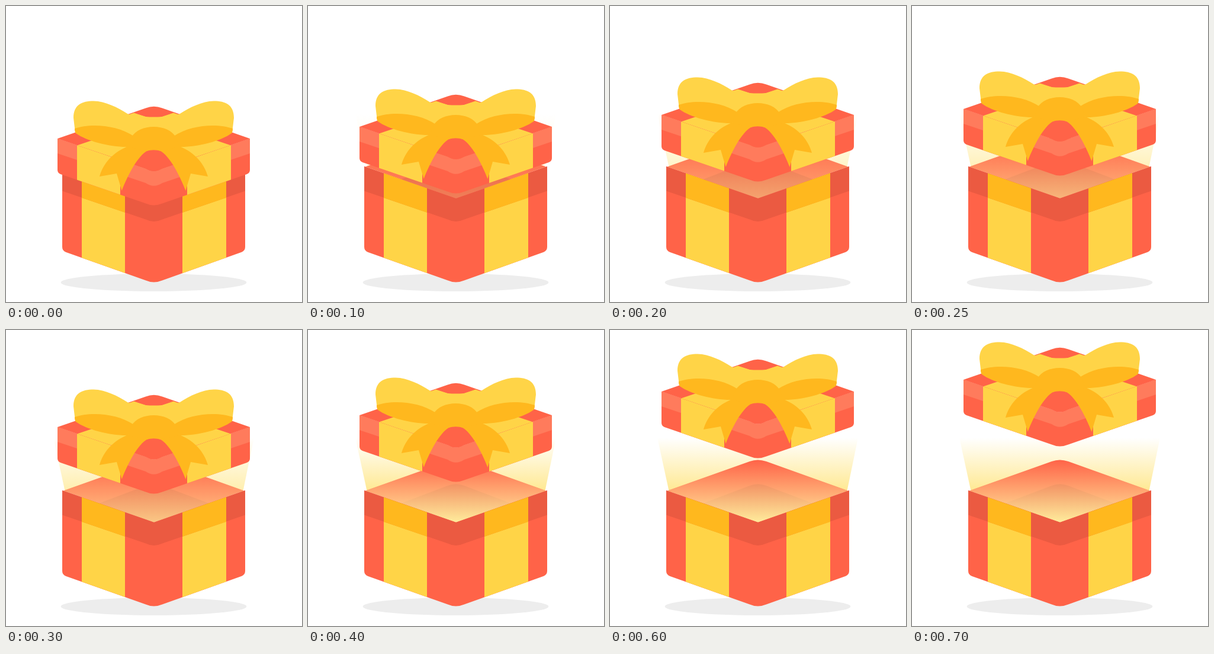
An HTML page for the animation above (0.75 s loop, 500 px wide and 500 px high).

```html
<!DOCTYPE html>
<html lang="en">
<head>
<meta charset="utf-8">
<title>Gift box</title>
<style>
  html, body { margin: 0; width: 100%; height: 100%; overflow: hidden; background: #fff; }
  svg { display: block; width: 100vw; height: 100vh; }
  .red { fill: #ff6348; }
  .rose { fill: #ff7b5c; }
  .dark { fill: #eb5a41; }
  .yellow { fill: #ffd447; }
  .orange { fill: #ffb81e; }
</style>
</head>
<body>
<svg viewBox="0 0 500 500">
  <defs>
    <linearGradient id="beamFade" gradientUnits="userSpaceOnUse" x1="0" y1="182" x2="0" y2="274">
      <stop offset="0" stop-color="#ffe88f" stop-opacity="0"/>
      <stop offset="1" stop-color="#ffe88f"/>
    </linearGradient>
    <linearGradient id="glowFade" gradientUnits="userSpaceOnUse" x1="0" y1="219" x2="0" y2="325">
      <stop offset="0" stop-color="#ffec9c" stop-opacity="0"/>
      <stop offset="1" stop-color="#ffec9c"/>
    </linearGradient>
    <path id="inside" d="M97 271.5L236 222Q249.5 217 264 222L402 271.5L250 325Z"/>
    <clipPath id="insideClip"><use href="#inside"/></clipPath>
    <path id="body" d="M95 271L250 325L404 271V407Q404 413.500 398 415.700L264 463.500Q249.500 469.500 236 463.500L101 415.700Q95 413.500 95 407Z"/>
    <clipPath id="bodyClip"><use href="#body"/></clipPath>
    <path id="side" d="M87 224L236 274.500Q249.500 283 264 274.500L412 224V277Q412 282 407 284L264 333.500Q249.500 339.500 236 333.500L92 284Q87 282 87 277Z"/>
    <clipPath id="sideClip"><use href="#side"/></clipPath>
    <path id="top" d="M87 224L236 172.500Q249.500 167 264 172.500L412 224L264 274.500Q249.500 283 236 274.500Z"/>
    <clipPath id="topClip"><use href="#top"/></clipPath>
    <g id="halfBow">
      <path class="orange" d="M206 237C181 247 164 266 158 288L187 283L195.500 312C204 290 222 252 240 244L250 225Z"/>
      <path class="yellow" d="M116.500 210L114 189C114 167 128 160.500 148 160.500C168 161 188 171 206 182.500L250 190V225L214 222Z"/>
      <path class="orange" d="M116 207C141 198 187 200 216 220L206 238C175 238.500 136 228 118 215Q116 213 116 207Z"/>
    </g>
  </defs>

  <ellipse cx="249.500" cy="467" rx="157" ry="15" fill="#ededed"/>

  <path id="beam" d="M80 182H419L400 274H100Z" fill="url(#beamFade)"/>
  <use href="#inside" class="red"/>
  <path class="dark" clip-path="url(#insideClip)" d="M150 295.500L236 263Q249.500 257.500 264 263L350 295.500L250 335Z"/>
  <use id="glow" href="#inside" fill="url(#glowFade)"/>

  <use href="#body" class="red"/>
  <g clip-path="url(#bodyClip)">
    <path class="yellow" d="M128 260H201V470H128ZM298 260H372V470H298Z"/>
    <g id="shade">
      <path class="dark" d="M95 260H404V312.500L264 360.500Q249.500 367.500 236 360.500L95 312.500Z"/>
      <path class="orange" d="M128 260H201V349L128 324ZM298 260H372V324L298 349Z"/>
    </g>
  </g>

  <g id="lid">
    <use href="#side" class="red"/>
    <g clip-path="url(#sideClip)">
      <path class="rose" d="M87 224H412V249L264 299Q249.500 308.500 236 299L87 249Z"/>
      <path class="yellow" d="M120 220H193V340H120ZM306 220H380V340H306Z"/>
    </g>
    <use href="#top" class="red"/>
    <path class="yellow" clip-path="url(#topClip)" d="M120 235.500L283 180.500L355 205L193 260ZM380 235.500L216 180.500L144 205L306 260Z"/>
    <path class="yellow" d="M216 181L236 187Q249.500 188 264 187L283 181V205H216Z"/>
    <use href="#halfBow"/>
    <use href="#halfBow" transform="matrix(-1 0 0 1 499 0)"/>
    <path class="orange" d="M212 222C224 198 275 198 287 222L293 238L262 245Q249.500 241.500 237 245L206 238Z"/>
  </g>
</svg>
<script>
  const STEP = 50, STEPS = 15, RISE = 10, GLOW_STEPS = 8;
  const [lid, beam, glow] = ["lid", "beam", "glow"].map(id => document.getElementById(id));
  const start = performance.now();

  function draw(now) {
    const step = Math.floor(Math.max(0, now - start) / STEP) % STEPS;
    const light = Math.min(1, step / GLOW_STEPS);
    lid.setAttribute("transform", `translate(0 ${-RISE * step})`);
    beam.setAttribute("opacity", light);
    glow.setAttribute("opacity", light);
    requestAnimationFrame(draw);
  }
  draw(start);
</script>
</body>
</html>
```
